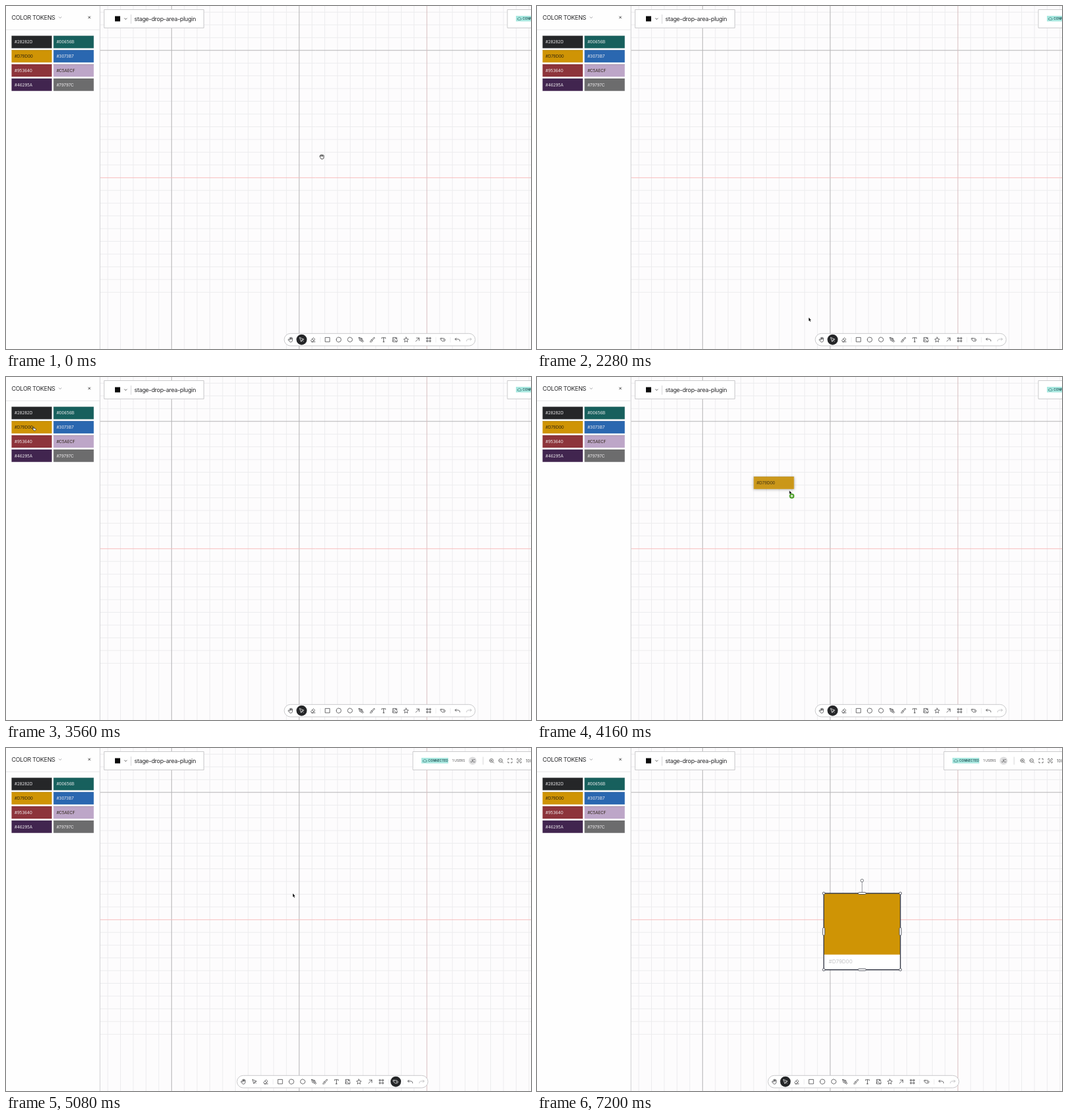
Animation of 800 by 524 pixels, one loop 8000 ms. Source, as an HTML page with a canvas:

```html
<!DOCTYPE html>
<html lang="en">
<head>
<meta charset="utf-8">
<title>Color tokens</title>
<style>
html, body { margin: 0; width: 100%; height: 100%; overflow: hidden; background: #fdfcfd; }
canvas { display: block; width: 800px; height: 524px; }
</style>
</head>
<body>
<canvas id="stage"></canvas>
<script>
const W = 800, H = 524, LOOP = 8000;
const canvas = document.getElementById('stage');
const c = canvas.getContext('2d');
const dpr = window.devicePixelRatio || 1;
canvas.width = W * dpr;
canvas.height = H * dpr;

const INK = '#252628', ORANGE = '#cf9405';
const TOKENS = [
  ['#28282D', '#252628'], ['#00656B', '#17605d'],
  ['#D79D00', ORANGE, 1], ['#3073B7', '#2a67b0'],
  ['#953640', '#8d343b'], ['#C5AECF', '#bda6c8', 1],
  ['#46295A', '#41254f'], ['#79797C', '#6c6c6d']
];

// Icons live in a 24 unit box
const ICONS = {
  hand: 'M8 13V6a2 2 0 0 1 4 0v5V4a2 2 0 0 1 4 0v7V6a2 2 0 0 1 4 0v9a7 7 0 0 1-12 5l-5-6a2 2 0 0 1 3-3z',
  pointer: 'M4 4l6 17 3-7 7-3zM13 13l6 6',
  eraser: 'M7 21l-4-5L14 4l7 7-10 10zM9 9l7 7M7 21h14',
  square: 'M3 3h18v18H3z',
  circle: 'M2 12a10 10 0 1 1 20 0a10 10 0 1 1-20 0',
  hexagon: 'M12 2l8 4 2 6-2 6-8 4-8-4-2-6 2-6z',
  pen: 'M3 3l13 4 2 8-3 3-8-2zM3 3l8 8M15 18l3-3 4 4-3 3zM10 11a2 2 0 1 0 4 0a2 2 0 1 0-4 0',
  brush: 'M10 11l9-9 3 3-9 9zM8 13l4 4c-1 5-6 5-10 4c3-1 2-7 6-8',
  type: 'M4 7V4h16v3M12 4v17M9 21h6',
  image: 'M14 3H3v18h18v-9M3 18l6-6 9 9M7 8h2M17 3v7M14 6h7',
  star: 'M12 2l3 7 7 1-5 5 1 7-6-4-6 4 1-7-5-5 7-1z',
  arrow: 'M5 19L19 5M8 5h11v11',
  frame: 'M2 6h20M2 18h20M6 2v20M18 2v20',
  tags: 'M2 6h8l7 7-6 7-9-8zM14 5l8 8-6 7M6 10h1',
  undo: 'M7 5L2 10l5 5M2 10h12c5 0 8 3 8 8',
  redo: 'M17 5l5 5-5 5M22 10H10c-5 0-8 3-8 8',
  cloud: 'M7 19a5 5 0 0 1 0-10a6 6 0 0 1 11 1a4 4 0 0 1 0 9z',
  zoomOut: 'M3 11a8 8 0 1 1 16 0a8 8 0 1 1-16 0M17 17l5 5M8 11h6',
  zoomIn: 'M3 11a8 8 0 1 1 16 0a8 8 0 1 1-16 0M17 17l5 5M8 11h6M11 8v6',
  expand: 'M3 8V3h5M16 3h5v5M21 16v5h-5M8 21H3v-5',
  fist: 'M5 11V8a2 2 0 0 1 4-1a2 2 0 0 1 4-1a2 2 0 0 1 4 1a2 2 0 0 1 4 2v6a7 7 0 0 1-14 2l-3-4a2 2 0 0 1 1-2zM9 8v3M13 7v4M17 8v3',
  point: 'M6 13V4a2 2 0 0 1 4 0v5l8 2q3 1 3 4c0 4-2 7-7 7c-4 0-6-2-11-8z'
};
for (const k in ICONS) ICONS[k] = new Path2D(ICONS[k]);

const TOOLS = [
  ['hand', 361.5], ['pointer', 378.5], ['eraser', 395.7], ['square', 418],
  ['circle', 435], ['hexagon', 452.2], ['pen', 469.2], ['brush', 486.3],
  ['type', 503.5], ['image', 520.7], ['star', 537.7], ['arrow', 555],
  ['frame', 572], ['tags', 594], ['undo', 616], ['redo', 633.5]
];

// time, x, y, eased approach
const TRACK = [
  [0, 481, 230], [400, 481, 230], [1120, 456.7, 519.3, 1], [2160, 456.7, 519.3],
  [2760, 46.3, 102.3, 1], [3080, 46.3, 102.3], [3360, 43, 79, 1], [3640, 43, 79],
  [3920, 200, 110], [4120, 361, 162], [4160, 384.6, 173.5],
  [4320, 425, 209], [4480, 437, 222.3], [LOOP, 437, 222.3]
];

function cursorAt(t) {
  let i = 1;
  while (i < TRACK.length - 1 && TRACK[i][0] <= t) i++;
  const a = TRACK[i - 1], b = TRACK[i];
  let k = Math.max(0, (t - a[0]) / (b[0] - a[0]));
  if (b[3]) k = k * k * (3 - 2 * k);
  return [a[1] + (b[1] - a[1]) * k, a[2] + (b[2] - a[2]) * k];
}

function line(x1, y1, x2, y2, color, width = 1) {
  c.strokeStyle = color;
  c.lineWidth = width;
  c.beginPath();
  c.moveTo(x1, y1);
  c.lineTo(x2, y2);
  c.stroke();
}

function box(x, y, w, h, r, fill, stroke, width = 1) {
  c.beginPath();
  c.roundRect(x, y, w, h, r);
  if (fill) { c.fillStyle = fill; c.fill(); }
  if (stroke) { c.strokeStyle = stroke; c.lineWidth = width; c.stroke(); }
}

const disc = (x, y, r, fill, stroke, width) =>
  box(x - r, y - r, 2 * r, 2 * r, r, fill, stroke, width);

function text(s, x, y, size, color, weight = 400, spacing = 0) {
  c.font = `${weight} ${size}px Inter, sans-serif`;
  c.letterSpacing = spacing + 'px';
  c.fillStyle = color;
  c.fillText(s, x, y);
}

function icon(name, x, y, size, color, fill, width = 0.75) {
  const s = size / 24;
  c.save();
  c.translate(x - size / 2, y - size / 2);
  c.scale(s, s);
  c.lineWidth = width / s;
  c.lineJoin = c.lineCap = 'round';
  c.strokeStyle = color;
  if (fill) { c.fillStyle = fill; c.fill(ICONS[name]); }
  c.stroke(ICONS[name]);
  c.restore();
}

function chevron(x, y, color) {
  c.strokeStyle = color;
  c.lineWidth = 0.8;
  c.beginPath();
  c.moveTo(x - 2, y - 1);
  c.lineTo(x, y + 1);
  c.lineTo(x + 2, y - 1);
  c.stroke();
}

function grid() {
  const step = 19.45;
  for (const major of [false, true]) {
    for (let i = -26; i < 10; i++) {
      if ((i % 10 === 0) !== major) continue;
      const x = 641.3 + i * step, y = 262.3 + i * step;
      const color = major ? '#b4b3b5' : '#ececee';
      if (x > 143) line(x, 0, x, H, i === 0 ? '#d9bfc1' : color);
      if (y > 0 && y < H) line(143, y, W, y, i === 0 ? '#f7bcbc' : color);
    }
  }
}

function chip(x, y, [label, color, dark]) {
  c.fillStyle = color;
  c.fillRect(x, y, 61.3, 19);
  c.shadowColor = 'transparent';
  c.setLineDash([1, 1]);
  line(x, y + 0.5, x + 61.3, y + 0.5, dark ? 'rgba(60,40,0,.4)' : 'rgba(0,0,0,.22)', 0.8);
  c.setLineDash([]);
  text(label, x + 4.5, y + 11.8, 6.2, dark ? '#2a2112' : '#f1eff1');
}

function sidebar() {
  c.fillStyle = '#fefefe';
  c.fillRect(0, 0, 143, H);
  line(143.2, 0, 143.2, H, '#cfcfd1');
  line(0, 36.3, 143, 36.3, '#e6e6e8');
  text('COLOR TOKENS', 8.5, 21, 9, '#2b2b2d', 400, -0.3);
  chevron(82.5, 17.5, '#8b8b8d');
  line(125.3, 15.7, 128.7, 19.1, '#333', 0.9);
  line(128.7, 15.7, 125.3, 19.1, '#333', 0.9);
  TOKENS.forEach((token, i) => chip(8.5 + (i % 2) * 63.9, 45.5 + (i >> 1) * 21.75, token));
}

function titleCard() {
  box(149.5, 5.5, 152, 28, 0, '#fff', '#cbcbcd');
  c.fillStyle = '#0c0c0c';
  c.fillRect(166, 15.5, 8, 8);
  chevron(182.3, 19.5, '#333');
  line(190.5, 13, 190.5, 27, '#d6d6d8');
  text('stage-drop-area-plugin', 195.5, 22.7, 9, '#2b2b2d', 400, -0.3);
}

function statusCard(dx) {
  c.save();
  c.translate(dx, 0);
  box(620, 5.5, 260, 28, 0, '#fff', '#cbcbcd');
  box(633, 15, 41, 8.6, 0, '#a9e8e0');
  icon('cloud', 638.2, 19.3, 7, '#23605f', null, 0.6);
  text('CONNECTED', 643.2, 21.2, 4.8, '#1f5355', 600);
  text('1 USERS', 680, 21.2, 4.9, '#4c4c4e');
  disc(711, 19.5, 6, '#dededf');
  text('JC', 707.4, 21.8, 6.3, '#4a4a4c');
  line(727, 13.5, 727, 25.5, '#d6d6d8');
  ['zoomIn', 'zoomOut', 'expand', 'expand'].forEach((name, i) =>
    icon(name, 740 + i * 14, 19.5, 8.3, '#444', null, 0.7));
  disc(782, 19.5, 1.5, null, '#444', 0.7);
  text('100%', 792, 21.8, 6.2, '#555');
  c.restore();
}

function toolbar(dx, active) {
  c.save();
  c.translate(dx, 0);
  box(352, 500.3, 291, 18.8, 9.4, '#fff', '#c9c9cb');
  for (const x of [407, 583, 605]) line(x, 506, x, 514, '#ececee');
  for (const [name, x] of TOOLS) {
    const on = name === active;
    if (on) disc(x, 509.7, 8, INK);
    icon(name, x, 509.7, 8.8, on ? '#fff' : name === 'redo' ? '#b2b2b4' : '#3d3d3f');
  }
  c.restore();
}

function swatchNode() {
  const x = 437, y = 222, s = 116.7, mid = x + s / 2, ink = '#3a3e4b';
  c.fillStyle = '#fff';
  c.fillRect(x, y, s, s);
  c.fillStyle = ORANGE;
  c.fillRect(x, y, s, 93.6);
  text('#D79D00', 444.6, 329.3, 8, '#c3c3c5');
  line(mid, 204, mid, y, '#7c7e86', 0.8);
  box(x, y, s, s, 0, null, ink, 1.4);
  disc(mid, 202.5, 2.2, '#fff', '#55585f', 0.8);
  for (const e of [0, s]) {
    box(mid - 6, y + e - 1.5, 12, 3, 1.5, '#fff', ink, 0.8);
    box(x + e - 1.5, y + s / 2 - 6, 3, 12, 1.5, '#fff', ink, 0.8);
    for (const f of [0, s]) disc(x + e, y + f, 1.9, '#fff', ink, 0.8);
  }
}

function ghost(t) {
  const fade = Math.min(1, Math.max(0, (4760 - t) / 160));
  const [x, y] = cursorAt(Math.max(3640, t - 40));
  c.save();
  c.globalAlpha = 0.88 * fade;
  c.shadowColor = 'rgba(0,0,0,.35)';
  c.shadowBlur = 4 * dpr;
  c.shadowOffsetY = dpr;
  chip(x - 30.7, y - 9.8, TOKENS[2]);
  c.restore();
}

function arrowCursor(x, y) {
  c.beginPath();
  [[0, 0], [0, 5.3], [1.2, 4.3], [2.1, 6.4], [3, 6], [2.1, 4], [3.7, 3.9]]
    .forEach(([px, py]) => c.lineTo(x + px, y + py));
  c.closePath();
  c.strokeStyle = '#fff';
  c.lineWidth = 1;
  c.stroke();
  c.fillStyle = '#111';
  c.fill();
}

function cursor(t) {
  const [x, y] = cursorAt(t);
  if (t < 1040) return icon('fist', x, y, 8.5, '#222', '#fff', 0.8);
  if (t < 2240 || (t >= 2640 && t < 3640)) return icon('point', x, y, 7, '#222', '#fff', 0.8);
  arrowCursor(x, y);
  if (t >= 3640 && t < 4600) {
    const bx = x + 3.7, by = y + 8.3;
    disc(bx, by, 3.9, '#4fa12b');
    line(bx - 2, by, bx + 2, by, '#fff', 1.1);
    line(bx, by - 2, bx, by + 2, '#fff', 1.1);
  }
}

function draw(t) {
  const wide = t < 5000, placed = t >= 5160;
  c.setTransform(dpr, 0, 0, dpr, 0, 0);
  c.fillStyle = '#fdfcfd';
  c.fillRect(0, 0, W, H);
  grid();
  if (placed) swatchNode();
  sidebar();
  titleCard();
  statusCard(wide ? 144 : 0);
  toolbar(wide ? 72 : 0, wide || placed ? 'pointer' : 'tags');
  if (t >= 3640 && t < 4760) ghost(t);
  if (t < 6160) cursor(t);
}

const start = performance.now();
function tick() {
  const t = (performance.now() - start) % LOOP;
  draw(Math.floor(t / 40) * 40);
  requestAnimationFrame(tick);
}
tick();
</script>
</body>
</html>
```
